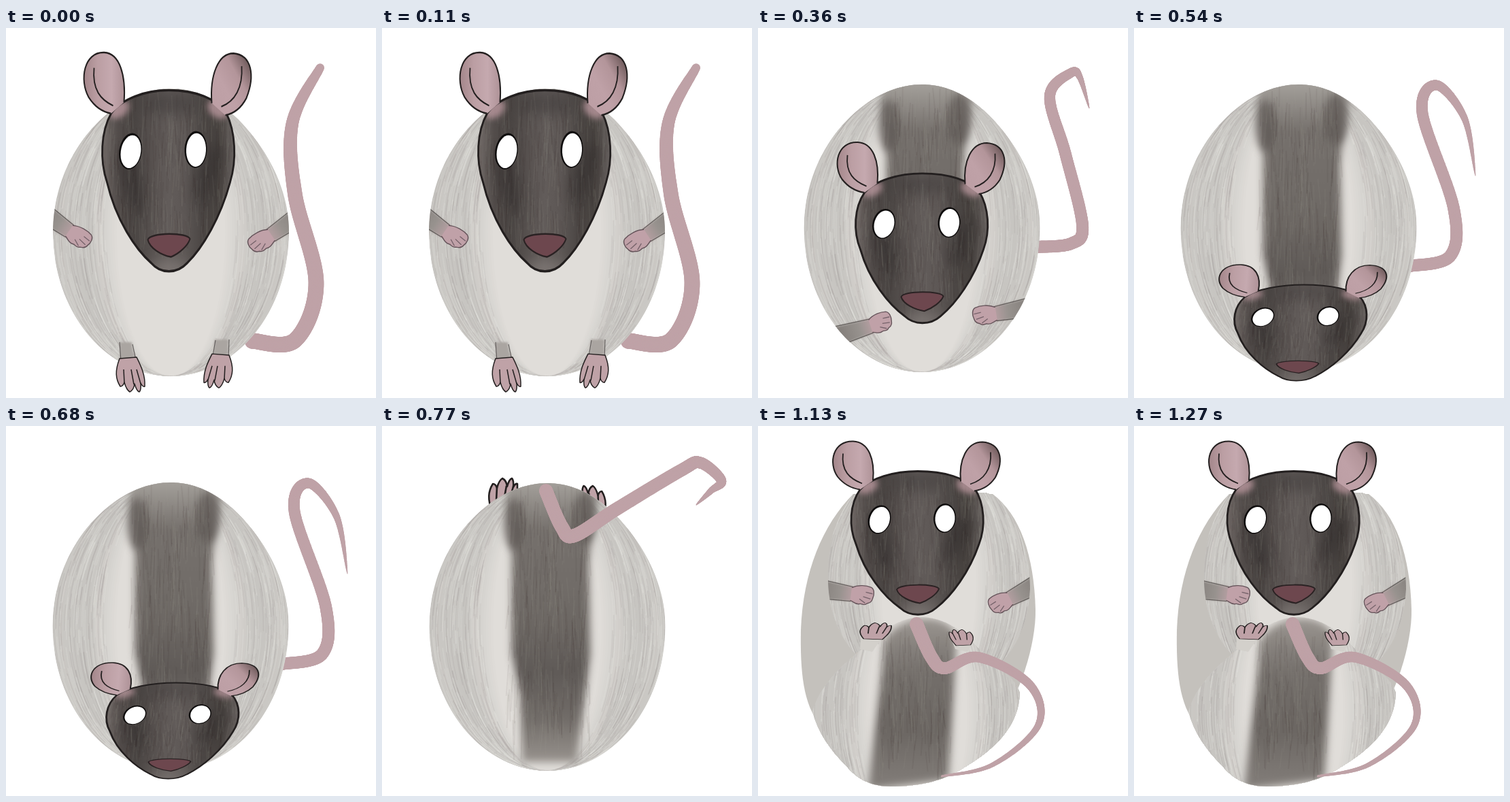
Animation, 544 px wide and 544 px high, one loop 1.36 s. Source, as an HTML page with a canvas:

```html
<!DOCTYPE html>
<html lang="en">
<head>
<meta charset="utf-8">
<title>Rolling rat</title>
<style>
html, body { margin: 0; width: 100%; height: 100%; overflow: hidden; background: #fff; }
canvas { display: block; }
</style>
</head>
<body>
<canvas id="stage" width="544" height="544"></canvas>
<script>
const ctx = document.getElementById('stage').getContext('2d');
const PINK = '#bfa2a7', INK = '#231f1f', PALE = '#d9c8ce';
const RX = 173.5, RY = 211.5;

let seed = 1;
const random = () => (seed = seed * 16807 % 2147483647) / 2147483647;
const between = (a, b) => a + (b - a) * random();

function isolated(draw) {
  ctx.save();
  draw();
  ctx.restore();
}

function clipped(path, draw) {
  isolated(() => { ctx.clip(path); draw(); });
}

function shape(d, fill, stroke, width = 2) {
  const path = new Path2D(d);
  if (fill) { ctx.fillStyle = fill; ctx.fill(path); }
  if (stroke) { ctx.strokeStyle = stroke; ctx.lineWidth = width; ctx.stroke(path); }
}

function soft(blur, draw) {
  isolated(() => { ctx.filter = `blur(${blur}px)`; draw(); });
}

function oval(x, y, rx, ry, fill, tilt = 0) {
  ctx.beginPath();
  ctx.ellipse(x, y, rx, ry, tilt, 0, 7);
  ctx.fillStyle = fill;
  ctx.fill();
}

// Evenly spaced colour stops
function gradient(x0, y0, x1, y1, ...colors) {
  const g = ctx.createLinearGradient(x0, y0, x1, y1);
  colors.forEach((color, i) => g.addColorStop(i / (colors.length - 1), color));
  return g;
}

// Nearly vertical hairs inside a box
function hairs(count, x0, y0, x1, y1, length) {
  ctx.lineWidth = 1.8;
  for (let i = 0; i < count; i++) {
    const x = between(x0, x1), y = between(y0, y1);
    ctx.strokeStyle = random() < .5 ? 'rgba(170,162,157,.08)' : 'rgba(35,30,30,.06)';
    ctx.beginPath();
    ctx.moveTo(x, y);
    ctx.lineTo(x + between(-4, 4), y + between(.4, 1) * length);
    ctx.stroke();
  }
}

// An ellipse whose shoulders are slightly flattened
function egg(cx, cy) {
  const path = new Path2D();
  for (let a = 0; a < Math.PI * 2; a += .03) {
    const r = Math.sin(a) < 0 ? 1 - (.026 + .014 * Math.cos(a)) * Math.sin(2 * a) ** 2 : 1;
    path.lineTo(cx + RX * r * Math.cos(a), cy + RY * r * Math.sin(a));
  }
  return path;
}

// Shading and hairs follow the meridians of the egg
function coat(cx, cy, rx = RX, ry = RY) {
  for (let k = 1; k > .45; k -= .02) {
    const shade = Math.min(1, (k - .45) / .27) - Math.max(0, k - .8) * .7;
    oval(cx, cy, rx * k, ry, `rgb(${225 - 26 * shade},${222 - 25 * shade},${218 - 25 * shade})`);
  }
  ctx.lineWidth = 1.5;
  for (let i = 0; i < 600; i++) {
    const k = between(.55, 1) * (random() < .5 ? -1 : 1), from = between(-1.4, 1.3);
    ctx.strokeStyle = random() < .5 ? 'rgba(235,233,228,.2)' : 'rgba(130,126,120,.12)';
    ctx.beginPath();
    for (let a = from; a < from + .31; a += .1)
      ctx.lineTo(cx + rx * k * Math.cos(a), cy + ry * Math.sin(a));
    ctx.stroke();
  }
}

// Dark band down the back, drawn for a body centred at (cx, cy)
function stripe(cx, cy, until = 544) {
  const visible = new Path2D();
  visible.rect(0, 0, 544, until);
  clipped(visible, () => {
    ctx.translate(cx - 243, cy - 295.5);
    soft(6, () => {
      shape('M180 70H318L304 200L306 335L286 494H206L204 400L191 335V190Z',
        gradient(0, 84, 0, 500, '#a39f9a', '#75706c', '#726d69', '#6c6763', '#5f5a57', '#716c68', '#9b9691'));
      oval(194, 145, 15, 38, 'rgba(90,84,81,.65)');
      oval(298, 135, 18, 38, 'rgba(90,84,81,.65)');
    });
    hairs(400, 185, 80, 306, 440, 60);
  });
}

function body(cx, cy, details) {
  clipped(egg(cx, cy), () => { coat(cx, cy); details(); });
}

function ear(outline, fold, fill) {
  shape(outline, fill, INK);
  shape(fold, null, INK, 1.8);
}

function eye(x, y, tilt) {
  oval(x, y, 16.5, 21.5, '#0e0c0c', tilt);
  oval(x + .5, y + .5, 14.5, 19.5, '#fff', tilt);
}

// Head and ears keep their width and squash vertically as the head nods
function head(dx, top, squash, skew = 0) {
  isolated(() => {
    ctx.transform(1, 0, skew, squash, dx - skew * 358, top - 133 * squash);
    const skull = 'M240 177C280 177 310 187 324 203C338 225 340 258 330 284C316 325 290 360 267 378C252 391 228 391 214 378C191 362 162 328 149 284C138 258 140 225 155 204C170 187 205 177 240 177Z';
    clipped(new Path2D(skull), () => {
      shape(skull, gradient(141, 0, 337, 0, '#746d6a', '#524c4a', '#4a4543', '#57514f', '#625c5a', '#5d5755', '#4c4745', '#47423f', '#6a6462'));
      soft(10, () => {
        oval(185, 285, 15, 40, 'rgba(45,40,40,.45)', -.4);
        oval(298, 275, 15, 40, 'rgba(45,40,40,.45)', .4);
        oval(240, 192, 40, 14, 'rgba(45,40,40,.35)');
        oval(240, 388, 30, 14, 'rgba(140,134,131,.6)');
      });
      hairs(350, 145, 175, 332, 340, 45);
      soft(4, () => {
        oval(166, 199, 16, 10, 'rgba(185,152,158,.8)', -.4);
        oval(312, 199, 16, 10, 'rgba(185,152,158,.8)', .4);
      });
    });
    shape(skull, null, INK, 2.8);
    ear('M174 191C177 160 168 134 145 133C115 132 108 165 122 185C130 195 142 202 155 204',
      'M130 151C127 177 140 188 158 195', gradient(115, 0, 176, 0, '#a3868a', '#bb9ea3', '#c5a9af', '#ac9095'));
    ear('M303 192C300 160 312 134 335 134C362 136 367 160 354 186C346 198 336 204 323 206',
      'M347 149C349 174 337 190 317 196', gradient(305, 190, 362, 150, '#bd9fa5', '#bfa1a7', '#b3959a', '#6d595a'));
    eye(183.5, 248, .3);
    eye(279.5, 246, .08);
    shape('M209 351C212 342 268 342 271 350C268 358 255 367 243 371C229 369 212 361 209 351Z', '#6d474e', '#2a2223');
  });
}

// From elbow to fingertips; the sleeve runs on so that the body edge can cut it
function arm(x0, y0, x1, y1) {
  isolated(() => {
    const size = Math.hypot(x1 - x0, y1 - y0) / 66;
    ctx.translate(x0, y0);
    ctx.rotate(Math.atan2(y1 - y0, x1 - x0));
    ctx.scale(size, x1 < x0 ? -1 : 1);
    soft(1.5, () => shape('M-25 -14L40 -9V12L-25 15Z', gradient(-10, 0, 42, 0, '#86817d', '#97928e', '#bfa3a8')));
    shape('M-25 -15L36 -9M-25 15L34 12', null, 'rgba(50,45,44,.6)', 1.3);
    shape('M33 -8C42 -14 54 -14 61 -12C66 -10 67 -2 65 4C64 11 60 11 58 12C54 17 50 13 48 14C42 17 38 12 33 11', '#c0a1a8', '#65545a', 1.4);
    shape('M64 -3L54 -4M62 5L51 3M55 12L46 7', null, '#75626a', 1.3);
  });
}

// Toes point down unless sy is negative
function foot(x, y, sx, sy, ink = 1.5) {
  isolated(() => {
    ctx.translate(x, y);
    ctx.scale(sx, sy);
    ctx.lineJoin = 'round';
    shape('M-17 -4C-24 14 -23 26 -16 37Q-12 37 -10 31Q-7 42 -2 45Q4 42 5 33Q8 44 12 45Q15 42 14 32Q17 38 20 37C21 20 14 6 8 -6Z', PINK, INK, ink);
    shape('M-10 32L-11 12M4 34L0 12M14 33L8 12', null, INK, ink);
  });
}

// A Catmull-Rom spline through the points that thins towards its tip
function tail(width, tip, power, ...points) {
  const last = points.length - 1;
  const at = i => points[Math.max(0, Math.min(last, i))];
  for (let s = 0; s < last; s += .015) {
    const i = Math.floor(s), t = s - i;
    const [x, y] = [0, 1].map(n => {
      const [a, b, c, d] = [-1, 0, 1, 2].map(k => at(i + k)[n]);
      return b + t / 2 * (c - a + t * (2 * a - 5 * b + 4 * c - d + t * (3 * (b - c) + d - a)));
    });
    const r = (width + (tip - width) * (s / last) ** power) / 2;
    oval(x, y, r, r, PINK);
  }
}

function raisedTail() {
  tail(20, 1, 4, [241, 95], [264, 148], [283, 161], [345, 122], [440, 65], [468, 54], [499, 80], [484, 95], [462, 116]);
}

function standing() {
  tail(23, 12, 4, [362, 460], [425, 459], [456, 375], [425, 245], [421, 140], [462, 58]);
  body(242.5, 300.5, () => { arm(64, 277, 123, 317); arm(420, 283, 359, 323); });
  soft(1.5, () => shape('M167 462H185L189 492H168Z M307 458H327L326 488H304Z', '#aaa5a1'));
  shape('M167 462L169 490M186 465L191 488M308 459L303 488M328 458L327 486', null, 'rgba(40,36,36,.6)', 1.2);
  foot(184, 490, 1, 1);
  foot(311, 485, -1, .98);
  head(-.5, 36, 1.263);
}

function bowing() {
  tail(24, 1, 5, [362, 460], [425, 459], [456, 380], [425, 250], [409, 180], [447, 121], [465, 165], [483, 234]);
  foot(185, 490, 1, 1);
  foot(312, 484, -1, .98);
  body(242.5, 299.5, () => { stripe(242.5, 299.5, 235); arm(74, 344, 143, 357); arm(418, 344, 353, 368); });
  head(0, 133, 1);
}

function crouching() {
  tail(18, 1, 4, [405, 322], [460, 317], [477, 290], [452, 185], [429, 100], [460, 66], [473, 72], [487, 118]);
  body(241, 294.5, () => { stripe(241, 294.5, 290); arm(134, 447, 196, 427); arm(384, 413, 316, 424); });
  head(1.5, 168, 1.043);
}

function tucking() {
  tail(18, 1, 4, [405, 350], [465, 335], [470, 265], [424, 125], [445, 84], [486, 133], [502, 217]);
  body(242, 294.5, () => stripe(242, 294.5));
  head(0, 348, .67, -.052);
}

function upended() {
  foot(179, 122, 1, -1, 2.6);
  foot(308, 133, -.95, -1, 2.6);
  body(243, 295.5, () => stripe(243, 295.5));
  raisedTail();
}

function feetUp() {
  shape('M160 70L185 62L178 118L155 120Z M286 74L316 80L319 116L300 108Z', PALE);
  foot(176, 69, 1.05, -1.02, 2.4);
  foot(303, 79, -1.02, -1, 2.4);
  body(237, 291.5, () => {
    stripe(237, 291.5);
    oval(411, 256, 7, 34, PALE);
  });
  ctx.translate(-6, -3);
  raisedTail();
}

function rising() {
  shape('M140 100C95 145 66 215 63 300C62 360 66 410 92 440H350C385 400 409 320 408 270C406 190 385 130 345 100Z', '#c4c1bc');
  const torso = 'M135 100L333 98C370 105 400 175 400 240C397 290 380 325 355 350H160C120 320 104 270 103 230C103 170 115 125 135 100Z';
  clipped(new Path2D(torso), () => {
    coat(251, 230, 152, 190);
    arm(104, 241, 170, 250);
    arm(399, 238, 341, 267);
  });
  const rump = 'M80 420C95 370 140 340 175 309C205 285 225 281 243 281C275 283 300 300 325 328C350 352 378 370 385 392C384 440 350 475 300 504C270 523 235 530 195 530C165 530 145 518 130 500C105 475 88 450 80 420Z';
  clipped(new Path2D(rump), () => {
    coat(235, 420, 158, 190);
    soft(6, () => shape('M185 318C205 275 280 270 292 310L280 520L162 535L182 360Z',
      gradient(0, 282, 0, 530, '#9b9691', '#736e6a', '#6b6662', '#827d79')));
    hairs(200, 178, 290, 284, 480, 50);
  });
  shape('M152 308L186 306L168 332L150 328Z M286 318L315 320L308 332L290 328Z', '#d3d0cb');
  foot(174, 311, 1.1, -.48, 1.6);
  foot(298, 320, -.85, -.46, 1.6);
  tail(20, 3, 1.5, [233, 291], [255, 340], [275, 356], [325, 340], [400, 381], [412, 440], [345, 498], [270, 515]);
  head(-5, 22.5, 1);
}

const poses = [[standing, 180], [bowing, 180], [crouching, 180], [tucking, 230], [upended, 180], [feetUp, 180], [rising, 230]];
const LOOP = poses.reduce((sum, [, ms]) => sum + ms, 0);
const start = performance.now();
let shown;

function tick() {
  let time = (performance.now() - start) % LOOP;
  const [pose] = poses.find(([, ms]) => (time -= ms) < 0);
  if (pose !== shown) {
    shown = pose;
    seed = 1;
    ctx.clearRect(0, 0, 544, 544);
    isolated(pose);
  }
  requestAnimationFrame(tick);
}
tick();
</script>
</body>
</html>
```
